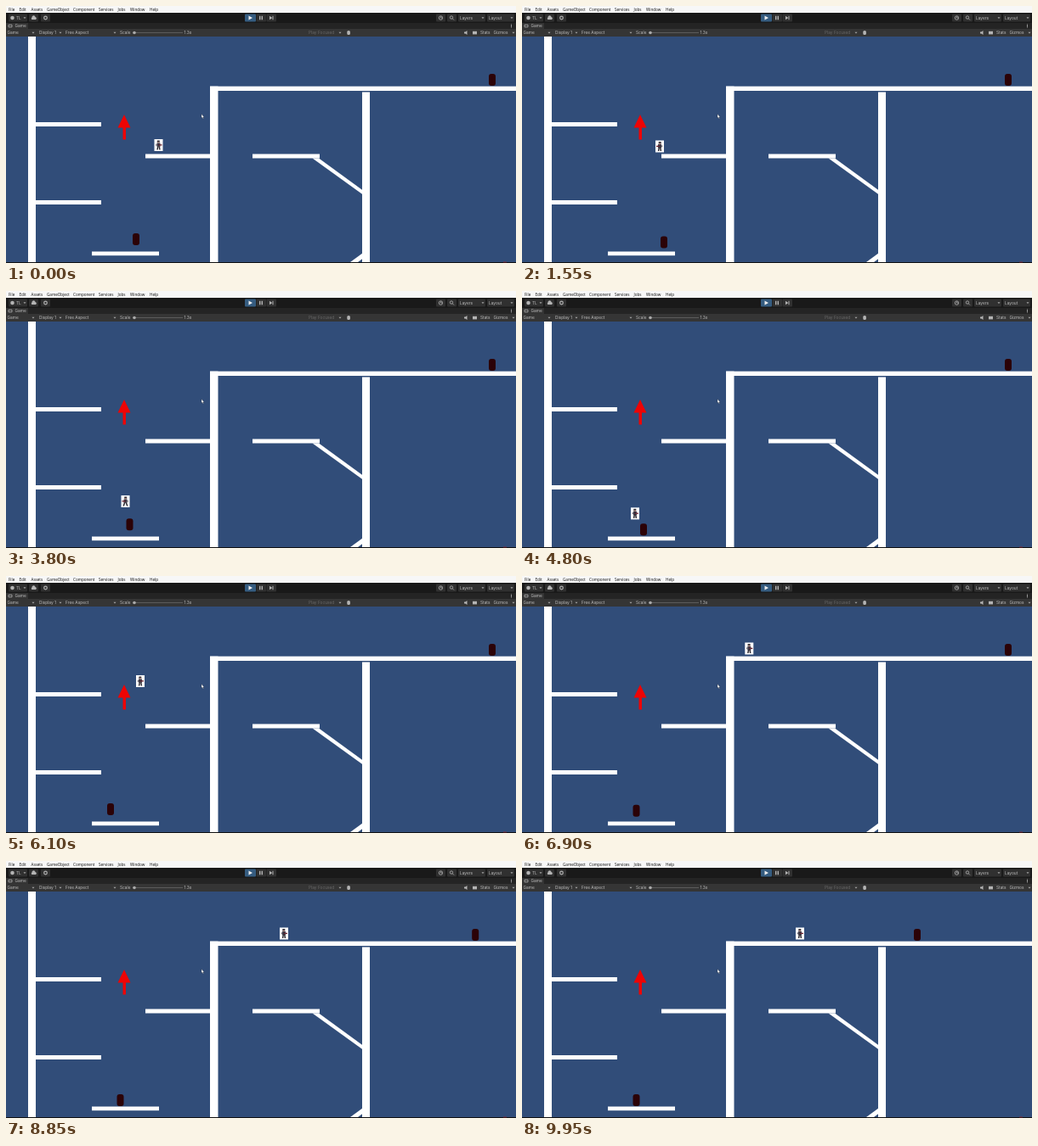
These frames come from a looping animation (600 by 303 pixels, 10000 ms). An HTML page:

```html
<!DOCTYPE html>
<html lang="en">
<head>
<meta charset="utf-8">
<title>Platformer in the editor</title>
<style>
html, body { margin: 0; width: 100%; height: 100%; overflow: hidden; background: #191919; }
svg { display: block; width: 600px; height: 303px; }
text { font: 4.8px Inter, sans-serif; fill: #bdbdbd; white-space: pre; }
.menu text { font: 4.6px "Open Sans", sans-serif; fill: #111; }
.icon { fill: #b4b4b4; }
.line { fill: none; stroke: #b4b4b4; stroke-width: .8; }
</style>
</head>
<body>
<svg viewBox="0 0 600 303">
  <defs>
    <path id="down" d="M-1.5 -.8h3L0 1z" fill="#aaa"/>
    <rect id="enemy" x="-4" y="-7" width="8" height="14" rx="3" fill="#2b0207"/>
  </defs>

  <rect width="600" height="303" fill="#191919"/>
  <rect width="600" height="8" fill="#f7f7f7"/>
  <g class="menu" id="menu"></g>

  <g fill="#303030">
    <rect x="3" y="9.5" width="22" height="9" rx="1"/>
    <rect x="27" y="9.5" width="11" height="9" rx="1"/>
    <rect x="41" y="9.5" width="11" height="9" rx="1"/>
    <rect x="294.500" y="9.500" width="11.500" height="9" rx="1"/>
    <rect x="306.500" y="9.500" width="11.500" height="9" rx="1"/>
    <rect x="506" y="9.500" width="11" height="9" rx="1"/>
    <rect x="519" y="9.500" width="11" height="9" rx="1"/>
    <rect x="532" y="9.500" width="32" height="9" rx="1"/>
    <rect x="566" y="9.500" width="32" height="9" rx="1"/>
  </g>
  <rect x="281" y="9.500" width="13" height="9" rx="1" fill="#355c80"/>
  <g class="icon">
    <circle cx="7.500" cy="14" r="2.300"/>
    <path d="M30.500 16a1.500 1.500 0 0 1 0-2.500a2 2 0 0 1 4-.5a1.600 1.600 0 0 1 .5 3z"/>
    <path d="M285.500 11.500l4.500 2.500l-4.500 2.500z" fill="#eee"/>
    <path d="M298 11.700h1.400v4.600h-1.400zM300.600 11.700h1.400v4.600h-1.400z"/>
    <path d="M310 11.700l3.300 2.300l-3.300 2.300zM313.500 11.700h1v4.600h-1z"/>
  </g>
  <g class="line">
    <circle cx="46.500" cy="14" r="1.800" stroke-width="1.200"/>
    <circle cx="511.500" cy="14" r="2.200"/>
    <path d="M511.500 12.500v1.500h1.300"/>
    <circle cx="524" cy="13.500" r="1.700"/>
    <path d="M525.300 14.800l1.700 1.700"/>
  </g>

  <rect y="20" width="600" height="7" fill="#242424"/>
  <rect y="20" width="26" height="7" fill="#343434"/>
  <path class="line" d="M3 22.200h4v2.600h-4z"/>
  <path d="M594.500 21.500v4" stroke="#bbb" stroke-width="1" stroke-dasharray="1 .5"/>
  <rect y="27" width="600" height="9" fill="#353535"/>
  <path d="M149 31.500H208" stroke="#666" stroke-width=".8"/>
  <circle cx="151" cy="31.500" r="1.800" fill="#aaa"/>
  <g class="icon">
    <rect x="401.300" y="29" width="3.600" height="5" rx="1.600"/>
    <path d="M539 30.500h1.500l2-1.500v5l-2-1.500h-1.500z"/>
    <path d="M549 29.800h5v3.600h-5z"/>
  </g>
  <g id="labels"></g>

  <rect y="36" width="600" height="266" fill="#314d79"/>
  <g fill="#fff">
    <rect x="26" y="36" width="9" height="266"/>
    <rect x="35" y="137" width="77" height="5"/>
    <rect x="35" y="229" width="77" height="5"/>
    <rect x="101" y="289.500" width="79" height="4.700"/>
    <rect x="164" y="174.500" width="77" height="5"/>
    <rect x="240" y="94.700" width="9.500" height="207.300"/>
    <rect x="240" y="94.700" width="360" height="5.300"/>
    <rect x="290" y="174.500" width="79" height="5"/>
    <rect x="419" y="101.500" width="9" height="200.500"/>
    <path d="M360.500 179.500H368L420 217.500V222.500z"/>
    <path d="M405 302L420 291V297.500L414 302z"/>
  </g>
  <path d="M139 128l7.500 15.500h-5.500v14h-3.500v-14h-6z" fill="#ee0404"/>

  <use id="hopper" href="#enemy"/>
  <use id="walker" href="#enemy"/>
  <g id="player">
    <rect x="-5" y="-7" width="10" height="14" fill="#fff"/>
    <g id="figure">
      <path d="M-1.700 -5.500h3v2.700h-3z" fill="#34313a"/>
      <path d="M-1.200 -3.800h2.300v1.200h-2.300z" fill="#b98d80"/>
      <path d="M-2 -2.400h4v4.200h-4z" fill="#383442"/>
      <path d="M-3.300 -1.200h1.500v2h-1.500z" fill="#77747c"/>
      <path d="M0 -.8h4v1.300h-4z" fill="#6c2733"/>
      <path id="legs" fill="none" stroke="#2b2830" stroke-width="1.500"/>
    </g>
  </g>
  <path d="M230 127.500v4.500l1-.9l.8 1.700l.7-.4l-.8-1.500h1.300z" fill="#fff" stroke="#222" stroke-width=".25"/>
  <rect y="302" width="600" height="1" fill="#111"/>
  <rect x="585" y="301.600" width="4" height=".8" fill="#8c2530"/>
</svg>
<script>
const LOOP = 10000, STEP = 50;
const NS = "http://www.w3.org/2000/svg";
const $ = id => document.getElementById(id);

function add(parent, tag, attrs, content = "") {
  const el = document.createElementNS(NS, tag);
  for (const key in attrs) el.setAttribute(key, attrs[key]);
  el.textContent = content;
  $(parent).append(el);
}

const menu = [[3, "File"], [15.5, "Edit"], [29.5, "Assets"], [48, "GameObject"],
  [79, "Component"], [109, "Services"], [131.5, "Jobs"], [146, "Window"], [169, "Help"]];
for (const [x, s] of menu) add("menu", "text", { x, y: 5.8 }, s);

const labels = [[12, 15.8, "TL"], [534, 15.8, "Layers"], [568, 15.8, "Layout"], [10.5, 25.4, "Game"],
  [1.5, 33.2, "Game"], [39, 33.2, "Display 1"], [70, 33.2, "Free Aspect"], [134, 33.2, "Scale"],
  [209.5, 33.2, "1.3x"], [558, 33.2, "Stats"], [573.5, 33.2, "Gizmos"]];
for (const [x, y, s] of labels) add("labels", "text", { x, y }, s);
add("labels", "text", { x: 356, y: 33.2, style: "fill:#686868" }, "Play Focused");

const arrows = [[22, 14], [561, 14], [595, 14], [32, 31.5], [64, 31.5], [128, 31.5], [393, 31.5], [597, 31.5]];
for (const [x, y] of arrows) add("labels", "use", { href: "#down", x, y });

const ease = { line: u => u, fall: u => u * u, rise: u => u * (2 - u) };

// Each row: time, x, y, vertical easing on the way to this row
const playerPath = [
  [0, 179.5, 164], [100, 179.5, 165.5, "fall"], [1350, 179.5, 165.5], [1550, 162, 165.5],
  [1600, 158, 165.5], [2190, 144, 280.5, "fall"], [3000, 144, 280.5], [3480, 141, 280.5],
  [3800, 140.5, 248, "rise"], [4120, 134, 280.5, "fall"], [4690, 133, 280.5],
  [5005, 133, 249, "rise"], [5320, 133, 280.5, "fall"], [5705, 133, 280.5],
  [5900, 133, 188, "line"], [6100, 158, 124, "rise"], [6420, 198, 70, "rise"],
  [6680, 240, 85.5, "fall"], [7180, 302, 85.5], [8400, 302, 85.5], [8600, 327, 85.5],
  [LOOP, 327, 85.5]
];
const hopperPath = [
  [0, 153, 282], [500, 167, 282], [1550, 167, 282], [3000, 145.5, 282], [3800, 145.5, 282],
  [4800, 143, 282], [5700, 143, 282], [6100, 123, 282], [6500, 134.5, 282], [LOOP, 134.5, 282]
];
const walkerPath = [[0, 572, 87], [8600, 572, 87], [9950, 465, 87], [LOOP, 465, 87]];

function at(path, t) {
  const i = path.findIndex(row => row[0] > t);
  const [t0, x0, y0] = path[i - 1], [t1, x1, y1, mode = "line"] = path[i];
  const u = (t - t0) / (t1 - t0);
  return { x: x0 + (x1 - x0) * u, y: y0 + (y1 - y0) * ease[mode](u), dx: x1 - x0 };
}

const place = (id, x, y) => $(id).setAttribute("transform", `translate(${x.toFixed(2)} ${y.toFixed(2)})`);

function hop(t) {
  return t < 7690 ? 7 * Math.abs(Math.sin(Math.PI * (t / 290.3 + 0.5))) : 0;
}

function draw(t) {
  const p = at(playerPath, t), h = at(hopperPath, t), w = at(walkerPath, t);
  place("player", p.x, p.y);
  place("hopper", h.x, h.y - hop(t));
  place("walker", w.x, w.y);
  const stride = Math.abs(p.dx) > 3 && t % 200 < 100 ? 2.3 : 1.4;
  $("legs").setAttribute("d", `M-.8 1.500L${-stride} 5.500M.8 1.500L${stride} 5.500`);
  $("figure").setAttribute("transform", p.dx < 0 ? "scale(-1 1)" : "");
}

const start = performance.now();
function tick(now) {
  const t = Math.max(0, now - start) % LOOP;
  draw(Math.floor(t / STEP) * STEP);
  requestAnimationFrame(tick);
}
draw(0);
requestAnimationFrame(tick);
</script>
</body>
</html>
```
